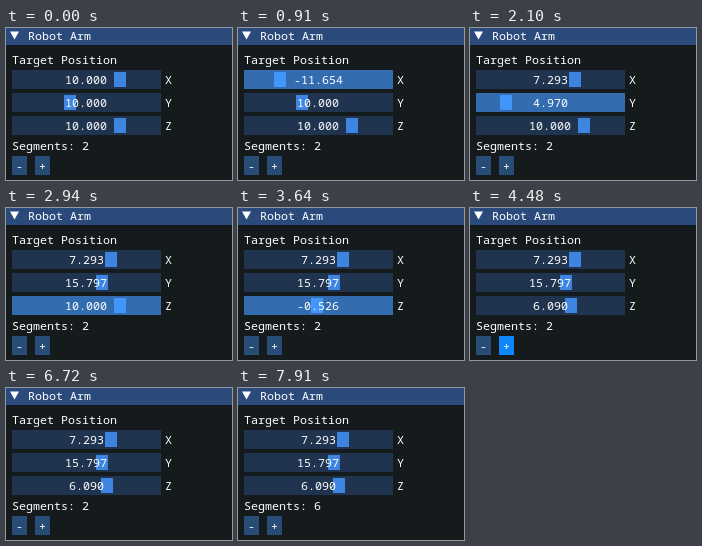
An HTML page for the animation above (8 s loop, 226 px wide and 152 px high).

```html
<!DOCTYPE html>
<html lang="en">
<head>
<meta charset="utf-8">
<title>Robot Arm</title>
<style>
  html, body { margin: 0; width: 100%; height: 100%; overflow: hidden; background: #151b1c; }
  svg { display: block; width: 226px; height: 152px; }
  rect { shape-rendering: crispEdges; }
  text { font: 11.667px "Noto Sans Mono", "DejaVu Sans Mono", monospace; fill: #fff; white-space: pre; }
</style>
</head>
<body>
<svg id="stage" viewBox="0 0 226 152"></svg>
<script>
const LOOP = 8000, STEP = 70;
const CHAR = 7, BASELINE = 11, ROW = 19;
const BAR = { x: 6, w: 149 }, GRAB = 12, TRAVEL = 133;

const FRAME = { idle: 'rgba(41,74,122,.54)', hover: 'rgba(66,150,250,.4)', active: 'rgba(66,150,250,.67)' };
const BUTTON = { idle: 'rgba(66,150,250,.4)', hover: '#4296fa', active: '#0f87fa' };

const svg = document.getElementById('stage');

function add(tag, attrs, content = '') {
  const el = document.createElementNS('http://www.w3.org/2000/svg', tag);
  for (const key in attrs) el.setAttribute(key, attrs[key]);
  el.textContent = content;
  svg.append(el);
  return el;
}
const box = (x, y, width, height, fill) => add('rect', { x, y, width, height, fill });
const label = (x, top, content) => add('text', { x, y: top + BASELINE }, content);

// Pointer state over time: [time, widget, pressed]
const clicks = (id, start, count) => Array.from({ length: count }, (_, i) => [
  [start + i * 2 * STEP, id, true],
  [start + (i * 2 + 1) * STEP, id]
]).flat();

const pointer = [
  [0, ''], [140, 'Y'], [350, ''],
  [420, 'X'], [630, 'X', true], [1470, 'X'], [1540, ''],
  [1610, 'Y'], [1820, 'Y', true], [2450, 'Y'], [2590, ''],
  [2660, 'Z'], [2940, 'Z', true], [3920, 'Z'], [4130, ''],
  [4270, '+'], ...clicks('+', 4480, 4),
  [5040, '-'], [5110, ''], [5320, '-'], [5460, '+'], [5600, ''],
  [6020, '-'], [6090, '-', true], [6230, '-'], ...clicks('-', 6300, 3),
  [6720, ''], [6860, '-'], [7000, '+'], ...clicks('+', 7070, 4),
  [7630, ''], [7700, '-'], [7910, '']
];

// Grab positions along the bar: [time, pixels]
const sliders = [
  { id: 'X', top: 42, min: -20, max: 20,
    keys: [[630, 99.75], [910, 27.75], [980, 27.75], [1400, 90.75]] },
  { id: 'Y', top: 65, min: 1, max: 25,
    keys: [[1820, 49.875], [1820, 84], [2100, 22], [2170, 18], [2380, 82]] },
  { id: 'Z', top: 88, min: -20, max: 20,
    keys: [[3010, 99.75], [3430, 21.75], [3780, 86.75]] }
];
const buttons = [{ id: '-', x: 6 }, { id: '+', x: 29 }];

function grabAt(keys, t) {
  const next = keys.findIndex(key => key[0] > t);
  if (next < 0) return keys[keys.length - 1][1];
  if (next === 0) return keys[0][1];
  const [t0, a] = keys[next - 1], [t1, b] = keys[next];
  const ease = (1 - Math.cos(Math.PI * (t - t0) / (t1 - t0))) / 2;
  return a + Math.round((b - a) * ease);
}

function pointerAt(t) {
  let now = pointer[0], segments = 2;
  for (const event of pointer) {
    if (event[0] > t) break;
    const released = now[2] && !event[2];
    if (released && now[1] === '+') segments++;
    if (released && now[1] === '-') segments--;
    now = event;
  }
  return { id: now[1], pressed: now[2], segments };
}

box(0, 0, 226, 152, '#151b1c');
box(0, 0, 226, 17, '#294a7a');
add('path', { d: 'M4 3.6H13L8.5 11.4Z', fill: '#fff' });
label(22, 1, 'Robot Arm');
label(6, 25, 'Target Position');
for (const s of sliders) {
  s.bar = box(BAR.x, s.top, BAR.w, ROW);
  s.grab = box(0, s.top + 2, GRAB, ROW - 4);
  s.text = label(0, s.top + 3, '');
  label(159, s.top + 3, s.id);
}
const counter = label(6, 111, '');
for (const b of buttons) {
  b.face = box(b.x, 128, 15, ROW);
  label(b.x + 4, 131, b.id);
}

function draw(time) {
  const t = Math.floor(time % LOOP / STEP) * STEP;
  const { id, pressed, segments } = pointerAt(t);
  const mode = w => w.id !== id ? 'idle' : pressed ? 'active' : 'hover';

  for (const s of sliders) {
    const px = grabAt(s.keys, t);
    const value = (s.min + px * (s.max - s.min) / TRAVEL).toFixed(3);
    s.bar.setAttribute('fill', FRAME[mode(s)]);
    s.grab.setAttribute('fill', mode(s) === 'active' ? '#4296fa' : '#3d85e0');
    s.grab.setAttribute('x', Math.round(BAR.x + 2 + px));
    s.text.setAttribute('x', Math.floor(BAR.x + (BAR.w - value.length * CHAR) / 2));
    s.text.textContent = value;
  }
  for (const b of buttons) b.face.setAttribute('fill', BUTTON[mode(b)]);
  counter.textContent = 'Segments: ' + segments;
}

const start = performance.now();
function tick() {
  draw(performance.now() - start);
  requestAnimationFrame(tick);
}
tick();
</script>
</body>
</html>
```
